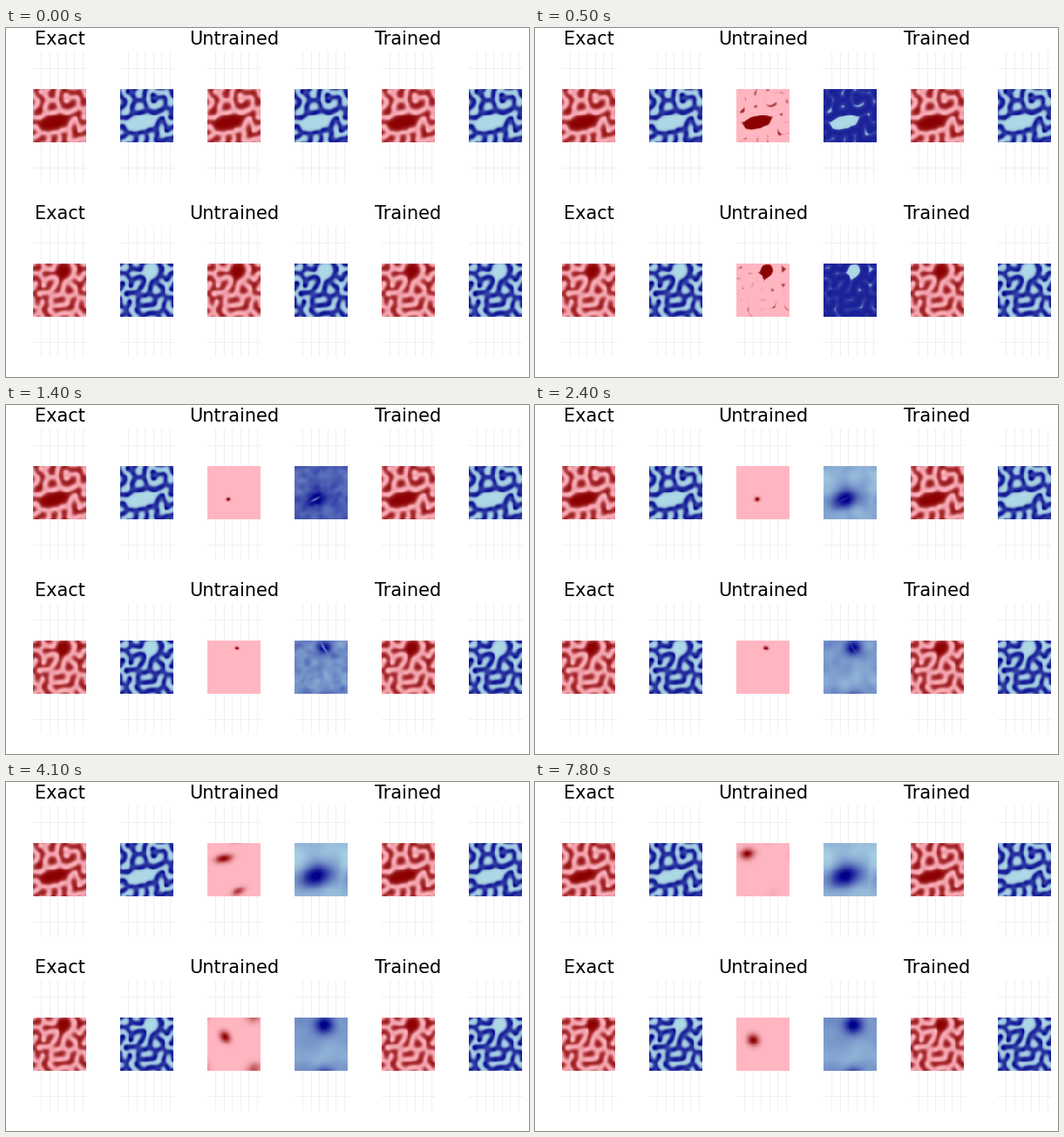
Animation of 600 by 400 pixels, one loop 8000 ms. Source, as a matplotlib script:

```python
import numpy as np
import matplotlib.pyplot as plt
from matplotlib.animation import FuncAnimation
from matplotlib.colors import LinearSegmentedColormap

plt.rcParams["font.family"] = "DejaVu Sans"
N = 64
FRAMES, INTERVAL = 80, 100
FEED, KILL, DU, DV = 0.06, 0.062, 0.16, 0.08
WARM_UP, STEPS = 1000, 5
Y, X = np.mgrid[:N, :N] + 0.5
REDS = LinearSegmentedColormap.from_list("reds", ["lightpink", "darkred"])
BLUES = LinearSegmentedColormap.from_list("blues", ["lightblue", "darkblue"])

# Positions and radii are in grid cells, tilts in degrees
ROWS = [
    dict(seed=4, hub=(25, 40), tilt=-14, empty=(18, 8),
         strokes=[[(0, 34), (15, 29), (20, 13)], [(28, 17), (30, 24), (44, 27)]],
         blob=(14, 9.3), haze=(.56, .1),
         spot=[(20, 19), (13, 13)], shape=[(7, 3.2), (5.8, 4.4)], swap=3.6,
         ghost=[(37, 58), (44, 60)], ghost_size=(5.5, 3), ghost_fade=(.75, .06)),
    dict(seed=9, hub=(36, 9), tilt=30, empty=(8, 9),
         strokes=[[(14, 23), (27, 19), (22, 35), (34, 37), (41, 23), (50, 30),
                   (39, 47)]],
         blob=(8, 8), haze=(.34, .24),
         spot=[(21.5, 23), (20.5, 27)], shape=[(5, 3.8), (5, 4.6)], swap=3.3,
         ghost=[(56, 62), (58, 64)], ghost_size=(6, 5), ghost_fade=(.6, 0)),
]


def ramp(t, a, b):
    p = np.clip((t - a) / (b - a), 0, 1)
    return p * p * (3 - 2 * p)


def mix(a, b, p):
    return np.asarray(a) + (np.asarray(b) - np.asarray(a)) * p


def wrap(d):
    return (d + N / 2) % N - N / 2


def radius2(at, size, tilt=0):
    """Squared elliptic distance on the periodic grid."""
    c, s = np.cos(np.radians(tilt)), np.sin(np.radians(tilt))
    dx, dy = wrap(X - at[0]), wrap(Y - at[1])
    return ((dx * c + dy * s) / size[0]) ** 2 + ((dy * c - dx * s) / size[1]) ** 2


def bump(*shape):
    return np.exp(-radius2(*shape) / 2)


def unit(f):
    return (f - f.min()) / (f.max() - f.min())


def noise(seed, sigma):
    k = np.fft.fftfreq(N) * 2 * np.pi
    damp = np.exp(-(k[:, None] ** 2 + k ** 2) * sigma ** 2 / 2)
    f = np.random.default_rng(seed).standard_normal((N, N))
    f = np.fft.ifft2(np.fft.fft2(f) * damp).real
    return f / f.std()


def sow(row):
    """Start field: key strokes, then spaced random dots around them."""
    rng = np.random.default_rng(row["seed"])
    dots = [mix(a, b, p) for line in row["strokes"]
            for a, b in zip(line, line[1:]) for p in np.linspace(0, 1, 8)]
    hole = radius2(row["hub"], row["empty"], row["tilt"]) < 1
    for p in rng.uniform(0, N, (600, 2)):
        gap = np.hypot(*wrap(np.array(dots) - p).T).min()
        if gap > 8.5 and not hole[int(p[1]), int(p[0])]:
            dots.append(p)
    v = 0.6 * np.max([np.exp(-radius2(p, (2.8, 2.8))) for p in dots], axis=0)
    return v * ~hole, ~hole


def laplace(f):
    return sum(np.roll(f, s, a) for s in (1, -1) for a in (1, 2)) - 4 * f


def react(u, v, steps, keep=1):
    """Gray-Scott reaction-diffusion."""
    for _ in range(steps):
        r = u * v * v
        u, v = (u + DU * laplace(u) - r + FEED * (1 - u),
                (v + DV * laplace(v) + r - (FEED + KILL) * v) * keep)
    return u, v


def simulate():
    v, keep = (np.array(f) for f in zip(*map(sow, ROWS)))
    u, v = react(1 - v, v, WARM_UP, keep)
    u, v = react(u, v, 40)
    states = []
    for _ in range(FRAMES):
        states.append([(unit(a), unit(b)) for a, b in zip(u, v)])
        u, v = react(u, v, STEPS)
    return states


def spots(row, t):
    """A dot at the hub that gives way to a drifting spot and its ghost."""
    late = ramp(t, row["swap"] - .2, row["swap"] + .3)
    p = ramp(t, 3.6, 7.8)
    r = np.interp(t, (1.2, 3.2), (1.3, 2.1))
    near = bump(row["hub"], (r * 1.15, r), row["tilt"])
    far = bump(mix(*row["spot"], p), mix(*row["shape"], p),
               -10 if row["tilt"] < 0 else 55)
    ghost = bump(mix(*row["ghost"], p), row["ghost_size"], -25)
    return unit((1 - late) * near
                + late * (far + mix(*row["ghost_fade"], ramp(t, 3.4, 6.8)) * ghost))


def cloud(row, t):
    """A dark blob in haze, with a bright hole that closes."""
    p = ramp(t, 1.2, 2.8)
    haze = mix(*row["haze"], p)
    size = np.array(row["blob"]) * mix(.7, 1, ramp(t, 1, 4))
    v = haze + mix(.05, .04, p) * noise(row["seed"], mix(2.5, 8, ramp(t, 1, 4)))
    v += (1.08 - haze) * bump(row["hub"], size, row["tilt"])
    v -= .7 * (1 - ramp(t, 1.2, 3.2)) * bump(row["hub"], (4, 1.1), 2 * row["tilt"])
    return np.clip(v, 0, 1)


def untrained(row, start, t):
    """The pattern fills up to a shrinking remnant, then dissolves."""
    u0, v0 = start
    fill, late = ramp(t, 0, .45), ramp(t, .9, 1.35)
    away = .08 * ramp(t, .45, 1.2) * np.sqrt(radius2(row["hub"], (1, 1)))
    level = .82 * min(t / .5, 1) + away
    left = 1 / (1 + np.exp(np.clip((level - u0) / .03, -40, 40)))
    u = mix(u0, left, fill)
    v = mix(v0, (.76 + .1 * v0) * (1 - left), fill)
    if late > 0:
        u, v = mix(u, spots(row, t), late), mix(v, cloud(row, t), late)
    return u, v


def hold(i):
    """Pictures stay longer as the motion slows."""
    step = 1 if i < 19 or 26 <= i < 45 else 2 if i < 57 else 3
    return i - i % step


STATES = simulate()
SIZE, LEFT, TOP = 61, 31, 70
fig = plt.figure(figsize=(6, 4), dpi=100, facecolor="white")
ax = fig.add_axes([0, 0, 1, 1])
ax.axis("off")
panels = []
for row in range(2):
    y = TOP + 200 * row
    for col in range(6):
        x = LEFT + 100 * col
        grid = dict(color="#f0f0f0", lw=.72, zorder=1)
        for tick in range(10, 61, 10):
            gx = x + (tick - .5) * SIZE / N
            ax.plot([gx, gx], [y - 43, y + 106], **grid)
        for tick in (-30, 90):
            gy = y + SIZE - (tick - .5) * SIZE / N
            ax.plot([x, x + SIZE], [gy, gy], **grid)
        panels.append(ax.imshow(
            np.zeros((N, N)), cmap=BLUES if col % 2 else REDS, vmin=0, vmax=1,
            extent=(x, x + SIZE, y + SIZE, y), interpolation="nearest",
            aspect="auto", zorder=2))
    for k, name in enumerate(("Exact", "Untrained", "Trained")):
        ax.text(61.5 + 200 * k, 19 + 200 * row, name, ha="center",
                va="baseline", fontsize=15, color="black")
ax.set_xlim(0, 600)
ax.set_ylim(400, 0)


def draw(i):
    i = hold(i)
    fields = []
    for k, row in enumerate(ROWS):
        exact = STATES[i][k]
        fields += [*exact, *untrained(row, STATES[0][k], i / 10), *exact]
    for im, f in zip(panels, fields):
        im.set_data(f)
    return panels


anim = FuncAnimation(fig, draw, frames=FRAMES, interval=INTERVAL, repeat=True,
                     repeat_delay=0, blit=False)
plt.show()
```
